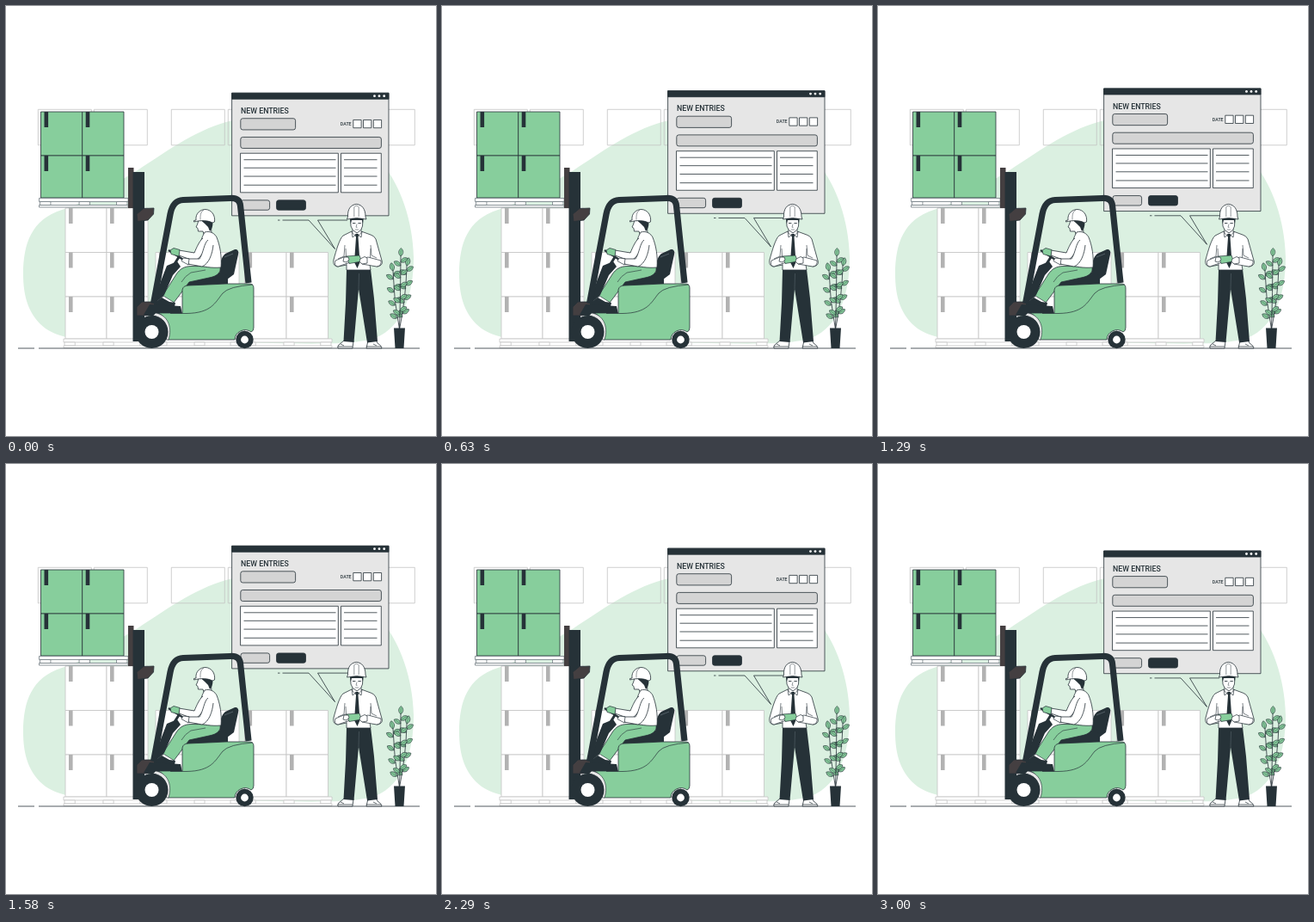
An HTML page with a canvas that plays this animation: 500x500 px, repeating every 3.04 s.

```html
<!DOCTYPE html>
<html lang="en">
<head>
<meta charset="utf-8">
<title>Warehouse entries</title>
<style>
html, body { margin: 0; width: 100%; height: 100%; overflow: hidden; background: #fff; }
canvas { display: block; width: 100vmin; height: 100vmin; }
</style>
</head>
<body>
<canvas id="stage"></canvas>
<script>
const LOOP = 3040, LIFT = 6.2, REST = 0.25;
const DARK = '#263238', GREEN = '#87ce9c', PALE = '#dbf0e1', LINE = '#c4c4c4',
      PANEL = '#e6e6e6', FIELD = '#d4d4d4', STEEL = '#443f41', WHITE = '#fff';

const canvas = document.getElementById('stage');
const ctx = canvas.getContext('2d');

function paint(path, fill, stroke, width = 0.8) {
  if (fill) { ctx.fillStyle = fill; ctx.fill(path); }
  if (stroke) { ctx.strokeStyle = stroke; ctx.lineWidth = width; ctx.stroke(path); }
}
const shape = (d, fill, stroke, width) => paint(new Path2D(d), fill, stroke, width);
const line = (d, color = DARK, width = 0.8) => shape(d, null, color, width);

function box(x, y, w, h, fill, stroke, r = 0, width = 0.8) {
  const p = new Path2D();
  p.roundRect(x, y, w, h, r);
  paint(p, fill, stroke, width);
}
function disc(x, y, r, fill, stroke, width) {
  const p = new Path2D();
  p.arc(x, y, r, 0, Math.PI * 2);
  paint(p, fill, stroke, width);
}

function crate(x, y, w, h, fill, edge, tape) {
  box(x, y, w, h, fill, edge);
  box(x + 4, y, 4.6, 18, tape);
}
function pallet(x, y, w, edge) {
  box(x, y, w, 4, WHITE, edge);
  for (const k of [0.01, 0.45, 0.87]) box(x + w * k, y + 4, w * 0.12, 4, WHITE, edge);
  box(x, y + 8, w, 2.5, WHITE, edge);
}

function drawBackdrop() {
  shape('M20 312C20 276 30 248 65 237C105 224 125 207 153 191C191 166 224 142 264 133' +
    'C330 122 402 142 440 186C458 210 473 248 474 292C474 335 462 372 430 386' +
    'C400 396 330 392 260 391L118 390C88 390 62 386 46 375C26 360 20 337 20 312Z', PALE);
  for (const x of [37, 102, 192, 258, 413]) box(x + 0.3, 120.3, 62, 41.5, null, LINE);
  for (let row = 0; row < 3; row++)
    for (const x of [69, 117]) crate(x, [235, 286.5, 338][row], 48, [51.5, 51.5, 49][row], WHITE, LINE, '#b2b2b2');
  for (let row = 0; row < 2; row++)
    for (const x of [174, 222.5, 277.5, 326]) crate(x, 286.5 + row * 51.5, 48.5, 51.5 - row * 2.5, WHITE, LINE, '#b2b2b2');
  pallet(67, 387, 102, LINE);
  pallet(174, 387, 100, LINE);
  pallet(277, 387, 102, LINE);
  line('M14 398H33M38 398H481');
}

// Narrowest installed face for the condensed labels.
const setFont = (size, family) => { ctx.font = `500 ${size}px "${family}", sans-serif`; };
function measure(family) {
  setFont(100, family);
  return ctx.measureText('NEW ENTRIES').width / 100;
}
ctx.fontStretch = 'extra-condensed';
const FACE = ['Noto Sans', 'Roboto', 'Open Sans', 'Lato', 'Liberation Sans']
  .map(name => ({ name, ratio: measure(name) }))
  .reduce((a, b) => (b.ratio < a.ratio ? b : a));
const TITLE = Math.min(13, 56 / FACE.ratio);

function label(text, x, middle, size) {
  ctx.fillStyle = DARK;
  ctx.fontStretch = 'extra-condensed';
  setFont(size, FACE.name);
  ctx.fillText(text, x, middle + ctx.measureText('E').actualBoundingBoxAscent / 2);
}

function drawPanel(dy) {
  ctx.save();
  ctx.translate(0, dy);
  box(262.6, 101, 182.4, 142.6, PANEL, DARK);
  box(262.6, 101, 182.4, 7, DARK, DARK);
  for (const x of [428.5, 434, 439.7]) disc(x, 104.4, 1.4, WHITE);
  label('NEW ENTRIES', 273, 121.2, TITLE);
  label('DATE', 388.8, 136.6, TITLE * 0.6);
  for (const x of [403.8, 415.5, 427.3]) box(x, 132.2, 9.3, 9.3, WHITE, DARK);
  box(272.8, 130.5, 63.8, 13.2, FIELD, DARK, 2.5);
  box(272.8, 152.2, 163.6, 13, FIELD, DARK, 2.5);
  box(272.5, 171, 113.8, 45.6, WHITE, DARK);
  box(389.5, 171, 46.8, 45.6, WHITE, DARK);
  for (const y of [178.5, 188, 197.8, 208]) line(`M276.5 ${y}H383.5M393 ${y}H431.5`);
  box(273, 225.6, 33.6, 11.4, FIELD, DARK, 2.5);
  box(314.5, 225.6, 34, 11.4, DARK, DARK, 2.5);
  line('M316 248.8H318.5M321.5 248.8H352L382.5 282.3L362.5 248.8H397');
  ctx.restore();
}

function drawLoad() {
  for (const y of [123, 174])
    for (const x of [40.5, 88.7]) crate(x, y, 48.3, y < 150 ? 51 : 49, GREEN, DARK, DARK);
  pallet(38.5, 223.5, 103.5, '#6f7a80');
}

function drawDriver() {
  // seat
  shape('M249 311C248 300 250 292 255 288L265 283.5C269 282 271 285 270 289L265 312L257 318Z', DARK);
  shape('M206 321C211 316 218 313 228 312L250 309L258 314V323L206 327Z', DARK);
  line('M254 292L264 288', '#66727a', 0.7);
  // legs and shoe
  shape('M249 303L216 302.5C207 302.5 202 306 198 312L182 337L195 345L213 321L236 316C247 314 250 309 249 303Z', GREEN, DARK);
  line('M232 307L215 310Q208 314 204 321', DARK, 0.6);
  shape('M183 337L195 344.5L193 347L181 340Z', WHITE, DARK, 0.6);
  shape('M172 346L181 339L190 344L197 345L196 349.5H172Z', DARK);
  // steering
  shape('M187 302L199 297L203 303L194 313L184 336L172 347L180 320Z', DARK);
  line('M189 284L214 300', DARK, 2.2);
  line('M201 292L194 303', DARK, 3);
  // head
  shape('M224 249L222.5 254L221 257L223 258.5L223.5 262L229 262L231 268L239 265L238 249Z', WHITE, DARK);
  shape('M227 249.5H240C241 254 240 259 237 262L235 257L231 253Z', DARK);
  // torso and arms
  shape('M231 263C238 261 243 265 245 269C249 279 251 291 250 304C239 305 229 303 221 301C224 289 224 275 231 263Z', WHITE, DARK);
  shape('M229 270C225 273 222 280 219 287L201 284V290L218 296C224 296 229 288 232 280', WHITE, DARK);
  shape('M235 272C230 276 230 286 225 294L211 294L212 300L228 303C236 300 240 288 241 278', WHITE, DARK);
  shape('M202 283.5L195 281.5L191 284L192 288.5L201 291Z', GREEN, DARK, 0.7);
  shape('M213 294L206 293L204 296.5L212 301Z', WHITE, DARK, 0.7);
  // helmet
  shape('M221 249C220 241 226 236.5 232 236.5C239 237 243.5 243 242.5 251L240 252C234 249 227 249 218.5 251L218.5 249.5Z', WHITE, DARK);
  line('M230 237C225.5 240 226 245 226 248.5', DARK, 0.5);
}

function drawTruck() {
  box(142, 188, 6.5, 47, STEEL);
  box(147.5, 193, 13.5, 197, DARK);
  shape('M152 242L160 235.5L172 235L171.5 242L165 249L153 250.5Z', STEEL, DARK);
  shape('M152 350L158 344L176 344L174 352L164 360H152Z', STEEL, DARK);

  drawDriver();

  // chassis
  shape('M167 347L203 349L205 358L172 361L160 359Z', DARK);
  shape('M177 357H205V330Q206 325 212 325L257 323H283Q288 323 288 328V374Q288 378 285 379' +
    'A12 12 0 0 0 266 388H188C192 372 187 362 177 357Z', GREEN, DARK);
  line('M191 357.5H210C239 357 243 345 252 334Q259 326 287 324', DARK, 0.7);
  shape('M174 357C187 359 194 372 189 388H186C190 372 184 362 171 360Z', '#e8e8e8', DARK, 0.6);

  // cab frame
  line('M171.5 346L191 242Q194 226 206 225.5L261 223.5Q271.5 223 272.5 232L282 322', DARK, 7.2);

  for (const [x, y, r, hub] of [[169.5, 379, 19, 8], [277.5, 388, 10.2, 4.4]]) {
    disc(x, y, r, DARK);
    disc(x, y, hub, WHITE);
  }
}

function drawClerk() {
  // shoes and trousers
  shape('M393 389L387 394Q385 396 386 398H403L404 389Z', WHITE, DARK);
  shape('M421 389L419 398H437Q437 395 432 392L430 388Z', WHITE, DARK);
  line('M386 396H403M419 396H436M389 393L393 395M427 393L431 395', DARK, 0.7);
  shape('M396 306H424L428 340L432 390L420 391.5L410 329L404.5 391L392.5 390L395 345Z', DARK);
  line('M410 329L410.5 311', '#56636a', 0.6);
  // shirt
  shape('M402 262L392 267C388 270 384 284 381 295C380 300 382 303 386 303L396 301V307H424L423 301' +
    'L432 303C437 302 438 299 437 296L430 271Q428 267 424 266L413 262Z', WHITE, DARK);
  line('M394 278L393 291L386 294M396 301L395 282M424 278L425 290L431 293M423 301L424 282', DARK, 0.6);
  // neck, collar and tie
  shape('M403 259V264L408 269L413 264V259Z', WHITE, DARK, 0.6);
  shape('M406 265H410L409.5 269L411.5 298L408.5 305L405 298L407 269Z', DARK);
  line('M402 262L403 269L408 265L413 269L414 262', DARK, 0.7);
  // forearms and tablet
  shape('M383 296L395 291L399 293L400 298L386 303Q381 302 383 296Z', WHITE, DARK, 0.7);
  shape('M436 296L421 292L414 294L414 300L431 303Q437 302 436 296Z', WHITE, DARK, 0.7);
  shape('M396 291L411 290L413.5 297L399 299.5Z', GREEN, DARK, 0.7);
  shape('M412 294L417 291.5L420 293V299L414 300L411 297Z', WHITE, DARK, 0.7);
  shape('M393 292L398 292L399 295L396 298L392 297Z', WHITE, DARK, 0.7);
  // head
  shape('M400.5 246L401 256Q402 261 408 264Q414 261 414.5 256L415 246Z', WHITE, DARK);
  shape('M400 247H415.5L415 253L413.8 249H402L400.8 253Z', DARK);
  line('M403 252.6H406.4M409.4 252.6H412.8', DARK, 0.9);
  line('M408 253.5L407 257.3H408.6M405.8 260H410', DARK, 0.5);
  shape('M397.5 245C397 236 401 231 407.5 230.4C414 231 418 236 418 245L419 248Q408 245 396.5 248Z', WHITE, DARK);
  line('M404.8 245V234Q407.5 230.5 410.2 234V245', DARK, 0.5);
}

function leaf(x, y, angle, len) {
  ctx.save();
  ctx.translate(x, y);
  ctx.rotate(angle);
  const a = len * 0.3, b = len * 0.36;
  shape(`M0 0C${a} ${-b} ${len - a} ${-b} ${len} 0C${len - a} ${b} ${a} ${b} 0 0Z`, GREEN, DARK, 0.6);
  line(`M0 0H${len * 0.8}`, DARK, 0.35);
  ctx.restore();
}

function drawPlant() {
  // each stem: tip x, tip y, leaf pairs
  for (const [tx, ty, pairs] of [[450, 308, 4], [466, 302, 4], [459, 291, 5]]) {
    const bend = 457.5 + (tx - 457.5) * 0.9, my = (ty + 376) / 2;
    line(`M457.5 376Q${bend} ${my} ${tx} ${ty}`);
    for (let i = 0; i < pairs; i++) {
      const k = 0.25 + 0.67 * i / (pairs - 1), q = 1 - k;
      const x = q * q * 457.5 + 2 * q * k * bend + k * k * tx;
      const y = q * q * 376 + 2 * q * k * my + k * k * ty;
      leaf(x, y, -0.55, 9);
      leaf(x, y + 4, Math.PI + 0.55, 9);
    }
    leaf(tx, ty, -Math.PI / 2 + (tx - 457.5) * 0.03, 9.5);
  }
  shape('M451 374.5H464L462.5 398H452.5Z', DARK);
}

function render(now) {
  const size = Math.min(innerWidth, innerHeight);
  const px = Math.round(size * (window.devicePixelRatio || 1));
  if (canvas.width !== px) canvas.width = canvas.height = px;
  ctx.setTransform(px / 500, 0, 0, px / 500, 0, 0);
  ctx.fillStyle = WHITE;
  ctx.fillRect(0, 0, 500, 500);
  ctx.lineJoin = 'round';

  const p = (now % LOOP) / LOOP;
  const rise = 1 - Math.abs(2 * p - 1);
  drawBackdrop();
  drawPanel(REST - LIFT * rise);
  drawLoad();
  drawTruck();
  drawClerk();
  drawPlant();
}

const start = performance.now();
function tick() {
  render(performance.now() - start);
  requestAnimationFrame(tick);
}
tick();
</script>
</body>
</html>
```
